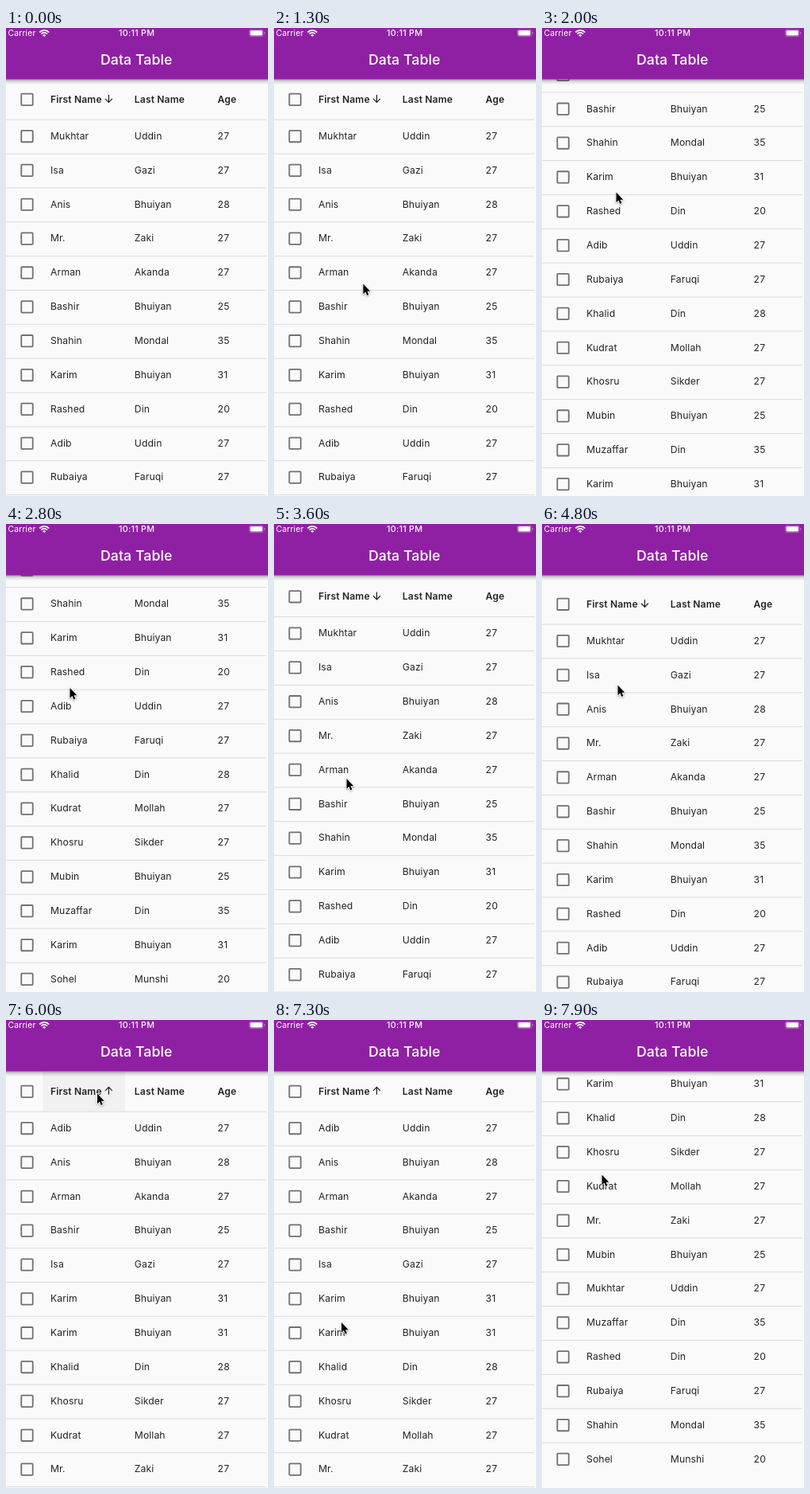
These frames come from a looping animation (330 px wide and 588 px high, 8000 ms). An HTML page with a canvas:

```html
<!DOCTYPE html>
<html lang="en">
<head>
<meta charset="utf-8">
<title>Data Table</title>
<style>
html, body { margin: 0; width: 100%; height: 100%; overflow: hidden; background: #fafafa; }
canvas { display: block; width: 330px; height: 588px; }
</style>
</head>
<body>
<canvas id="stage"></canvas>
<script>
const W = 330, H = 588, LOOP = 8000, STEP = 100;
const BAR = 64.6, TOP = 65, HEAD = 49.7, ROW = 42.86, TABLE_W = 328;
const COLS = [56, 161.8, 266.6];
const INK = 'rgba(0,0,0,0.86)', PURPLE = '#8f20a3';
const SORT_AT = 5900;

const rows = `Mukhtar Uddin 27
Isa Gazi 27
Anis Bhuiyan 28
Mr. Zaki 27
Arman Akanda 27
Bashir Bhuiyan 25
Shahin Mondal 35
Karim Bhuiyan 31
Rashed Din 20
Adib Uddin 27
Rubaiya Faruqi 27
Khalid Din 28
Kudrat Mollah 27
Khosru Sikder 27
Mubin Bhuiyan 25
Muzaffar Din 35
Karim Bhuiyan 31
Sohel Munshi 20`.split('\n').map(line => line.split(' '));
const sorted = [...rows].sort((a, b) => (a[0] < b[0] ? -1 : a[0] > b[0] ? 1 : 0));

// Flings go to the end of the list and back by turns.
const SCROLL_END = 299;
const flings = [1724, 2776, 3680, 4182, 7380];

// Stops of the pointer tip: time, x, y
const stops = [
  [700, 190, 6], [1500, 98, 380], [1650, 98, 380], [2000, 93.5, 206.5],
  [2800, 80.5, 206], [3600, 91.5, 320], [4150, 88, 206], [4500, 92, 300],
  [4800, 95.5, 202.5], [5200, 105, 110], [5700, 115, 92.5], [6600, 115, 92.5],
  [7300, 85, 380], [7900, 75.5, 194.5]
];

const canvas = document.getElementById('stage');
const ctx = canvas.getContext('2d');
const dpr = window.devicePixelRatio || 1;
canvas.width = W * dpr;
canvas.height = H * dpr;

const clamp = v => Math.max(0, Math.min(1, v));
const smooth = u => u * u * (3 - 2 * u);

// Step response of a damped spring: a quick run with a small overshoot.
function spring(ms) {
  if (ms <= 0) return 0;
  const damping = 0.7, swing = Math.sqrt(1 - damping ** 2), p = ms * 0.0085;
  return 1 - Math.exp(-damping * p) *
    (Math.cos(swing * p) + damping / swing * Math.sin(swing * p));
}

const scrollAt = t => flings.reduce(
  (sum, start, i) => sum + (i % 2 ? -1 : 1) * SCROLL_END * spring(t - start), 0);

function pointerAt(t) {
  const next = stops.findIndex(stop => stop[0] >= t);
  if (next < 1) return stops[next < 0 ? stops.length - 1 : 0].slice(1);
  const a = stops[next - 1], b = stops[next];
  const u = smooth((t - a[0]) / (b[0] - a[0]));
  return [1, 2].map(i => a[i] + (b[i] - a[i]) * u);
}

function text(str, x, y, size, weight, color, spacing = 0, align = 'left') {
  ctx.font = `${weight} ${size}px Inter, Roboto, sans-serif`;
  ctx.letterSpacing = spacing + 'px';
  ctx.textAlign = align;
  ctx.fillStyle = color;
  ctx.fillText(str, x, y);
}

function rect(x, y, w, h, color) {
  ctx.fillStyle = color;
  ctx.fillRect(x, y, w, h);
}

function pill(x, y, w, h, r) {
  ctx.beginPath();
  ctx.roundRect(x, y, w, h, r);
}

function checkbox(y) {
  ctx.strokeStyle = '#707070';
  ctx.lineWidth = 1.8;
  pill(19.3, y - 7.2, 14.4, 14.4, 0.8);
  ctx.stroke();
}

function sortArrow(x, y, angle) {
  ctx.save();
  ctx.translate(x, y);
  ctx.rotate(angle);
  ctx.strokeStyle = INK;
  ctx.lineWidth = 1.25;
  ctx.beginPath();
  ctx.moveTo(0, -4.9);
  ctx.lineTo(0, 4.4);
  ctx.moveTo(-4.5, 0);
  ctx.lineTo(0, 4.5);
  ctx.lineTo(4.5, 0);
  ctx.stroke();
  ctx.restore();
}

function drawTable(t) {
  const top = TOP - scrollAt(t);
  const turn = clamp((t - SORT_AT + 50) / 150);
  const glow = clamp((t - SORT_AT + 100) / 200) * clamp((6800 - t) / 200);
  const mid = top + HEAD / 2;

  rect(46, top, 104, HEAD, `rgba(0,0,0,${0.035 * glow})`);
  checkbox(mid);
  ['First Name', 'Last Name', 'Age'].forEach((label, i) =>
    text(label, COLS[i], mid + 3.8, 12.1, 600, INK, 0.15));
  sortArrow(129.4, mid - 1, Math.PI * turn);

  (t >= SORT_AT ? sorted : rows).forEach((row, i) => {
    const y = top + HEAD + i * ROW;
    if (y < 0 || y > H) return;
    rect(0, y, TABLE_W, 0.95, '#d9d9d9');
    checkbox(y + ROW / 2 - 0.1);
    row.forEach((cell, c) => text(cell, COLS[c], y + ROW / 2 + 3.7, 12.2, 400, INK, 0.1));
  });
}

function drawWifi(x, y) {
  ctx.strokeStyle = ctx.fillStyle = '#fff';
  ctx.lineWidth = 1.7;
  const from = -Math.PI * 0.76, to = -Math.PI * 0.24;
  [5.2, 8.2].forEach(r => {
    ctx.beginPath();
    ctx.arc(x, y, r, from, to);
    ctx.stroke();
  });
  ctx.beginPath();
  ctx.moveTo(x, y);
  ctx.arc(x, y, 2.9, from, to);
  ctx.fill();
}

function drawBattery() {
  ctx.strokeStyle = ctx.fillStyle = 'rgba(255,255,255,0.35)';
  ctx.lineWidth = 0.8;
  pill(306.4, 1.9, 17.8, 8.8, 2.3);
  ctx.stroke();
  pill(325.1, 4.8, 1.2, 3, 0.6);
  ctx.fill();
  ctx.fillStyle = '#fff';
  pill(307.6, 3.1, 15.4, 6.4, 1.4);
  ctx.fill();
}

function drawBar() {
  const shade = ctx.createLinearGradient(0, BAR, 0, BAR + 6.5);
  shade.addColorStop(0, 'rgba(0,0,0,0.38)');
  shade.addColorStop(0.35, 'rgba(0,0,0,0.14)');
  shade.addColorStop(1, 'rgba(0,0,0,0)');
  rect(0, BAR, W, 6.5, shade);
  rect(0, 0, W, BAR, PURPLE);
  text('Carrier', 2.6, 10.2, 10.4, 400, '#fff', 0.12);
  drawWifi(48.2, 11);
  text('10:11 PM', 164.6, 10.2, 10.7, 500, '#fff', 0.3, 'center');
  drawBattery();
  text('Data Table', 164.2, 46.2, 17.7, 500, '#fff', 0.08, 'center');
}

function drawPointer(t) {
  if (t < stops[0][0]) return;
  const shape = [[0, 0], [0, 14.4], [3.3, 11.4], [5.5, 16.4], [7.8, 15.4], [5.7, 10.5], [10, 10.5]];
  ctx.save();
  ctx.translate(...pointerAt(t));
  ctx.scale(0.88, 0.88);
  ctx.beginPath();
  shape.forEach(([x, y]) => ctx.lineTo(x, y));
  ctx.closePath();
  ctx.lineWidth = 1.8;
  ctx.lineJoin = 'round';
  ctx.strokeStyle = '#fff';
  ctx.shadowColor = 'rgba(0,0,0,0.35)';
  ctx.shadowBlur = 2.5 * dpr;
  ctx.shadowOffsetY = dpr;
  ctx.stroke();
  ctx.shadowColor = 'transparent';
  ctx.fillStyle = '#000';
  ctx.fill();
  ctx.restore();
}

function frame() {
  // The picture advances in whole steps.
  const t = Math.floor(performance.now() % LOOP / STEP) * STEP;
  ctx.setTransform(dpr, 0, 0, dpr, 0, 0);
  rect(0, 0, W, H, '#fafafa');
  drawTable(t);
  drawBar();
  drawPointer(t);
  requestAnimationFrame(frame);
}
frame();
</script>
</body>
</html>
```
